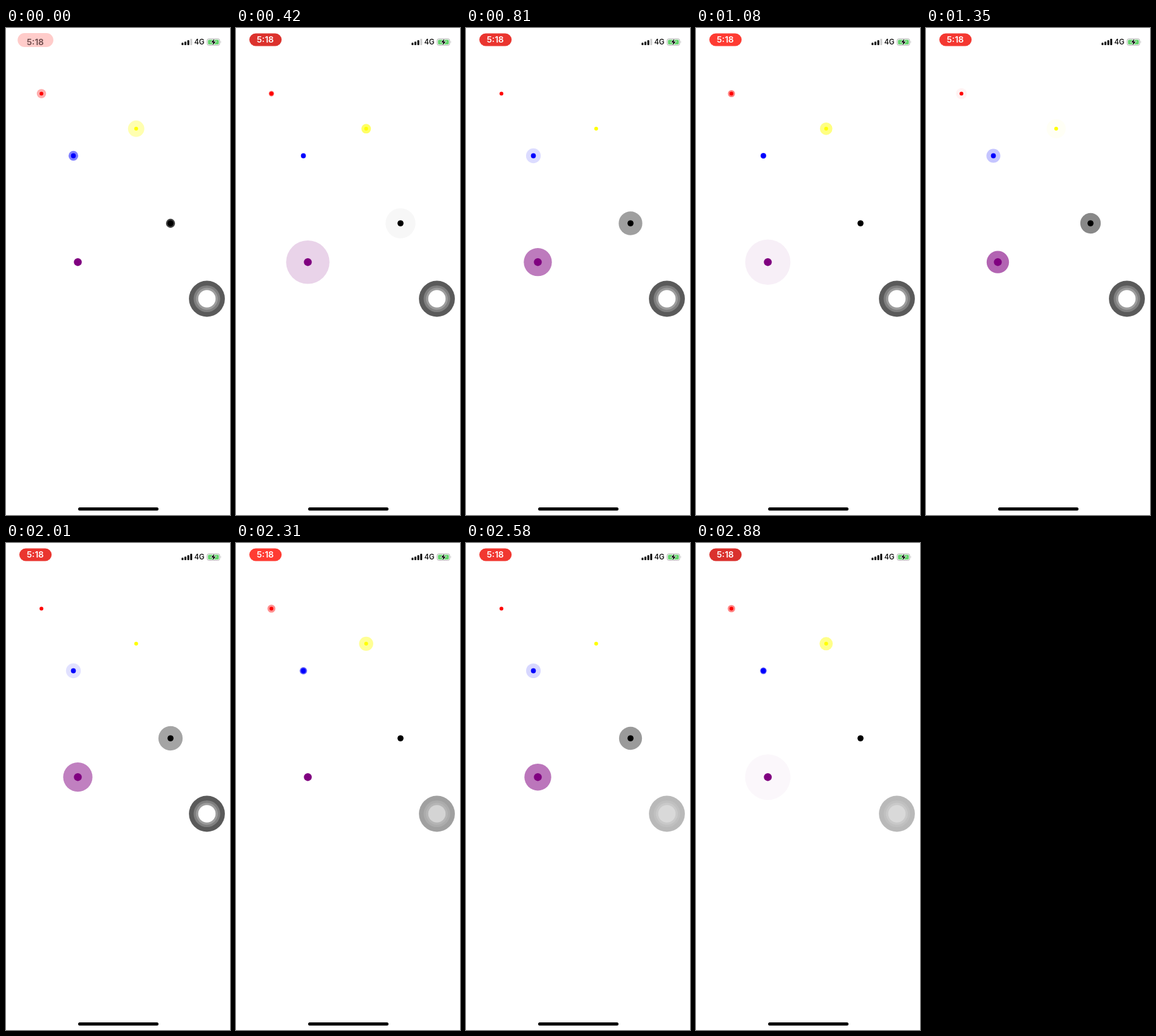
Write an HTML page that moves like this. It is 354 px wide and 768 px high and loops after 2.91 s.

```html
<!DOCTYPE html>
<html lang="en">
<head>
<meta charset="utf-8">
<title>Pulsing dots</title>
<style>
  html, body { margin: 0; width: 100%; height: 100%; overflow: hidden; background: #fff; }
  svg { display: block; width: 354px; height: 768px; }
  text { font-family: Inter, "Liberation Sans", sans-serif; text-anchor: middle; }
</style>
</head>
<body>
<svg viewBox="0 0 354 768">
  <rect id="pill"/>
  <text id="clock" x="46.3" font-size="13.5" font-weight="600">5:18</text>

  <g id="signal">
    <rect x="277.5" y="23.2" width="3" height="3.8" rx=".8"/>
    <rect x="282" y="21.5" width="3" height="5.5" rx=".8"/>
    <rect x="286.6" y="19.3" width="3" height="7.7" rx=".8"/>
    <rect id="bar4" x="291.2" y="17" width="3" height="10" rx=".8"/>
  </g>
  <text x="305.5" y="26.4" font-size="11.5" font-weight="500">4G</text>

  <rect x="317.8" y="17" width="20" height="10.4" rx="3" fill="none" stroke="#a9a9a9" stroke-width=".9"/>
  <rect x="319.2" y="18.4" width="17.2" height="7.6" rx="1.8" fill="#65d46e"/>
  <path d="M339.2 20.6q1.4 1.6 0 3.2z" fill="#a9a9a9"/>
  <path d="M329.3 16.8l-5 6h3.3l-1.3 4.8 5.2-6.2h-3.4z" stroke="#fff" stroke-width="1.4" paint-order="stroke"/>

  <g id="dots"></g>
  <g id="button"></g>
  <rect x="114" y="756" width="127" height="5" rx="2.5"/>
</svg>
<script>
const LOOP = 2910, STEP = 30, PULSE = 594;
const $ = id => document.getElementById(id);
const clamp = v => Math.max(0, Math.min(1, v));
const mix = (a, b, k) => a + (b - a) * k;
const rgb = (a, b, k) => `rgb(${a.map((v, i) => Math.round(mix(v, b[i], k)))})`;

function set(el, attrs) {
  for (const key in attrs) el.setAttribute(key, attrs[key]);
  return el;
}

function circle(parent, cx, cy, r, fill) {
  const el = document.createElementNS("http://www.w3.org/2000/svg", "circle");
  return parent.appendChild(set(el, { cx, cy, r, fill }));
}

// x, y, dot radius, halo radius, starting phase, colour
const halos = [
  [56, 103.5, 3, 8.7, .68, "#f00"],
  [205.7, 158.8, 3, 15.2, .69, "#ff0"],
  [106.5, 201.5, 3.9, 12, .5, "#00f"],
  [260, 308, 4.8, 23.8, .26, "#000"],
  [113.5, 369.2, 6.2, 36, .12, "#800080"]
].map(([x, y, r, max, phase, color]) => {
  const el = circle($("dots"), x, y, 0, color);
  circle($("dots"), x, y, r, color);
  return { el, max, phase };
});

// radius, then grey level when pressed, fading and idle
const rings = [
  [28.4, 90, 160, 185],
  [21, 127, 172, 192],
  [17.2, 156, 181, 201],
  [13.7, 255, 212, 217]
].map(([r, ...greys]) => ({ el: circle($("button"), 317.5, 427, r), greys }));

function drawHalos(t) {
  for (const { el, max, phase } of halos) {
    const u = (phase + t / PULSE) % 1;
    set(el, { r: max * Math.sin(u * Math.PI / 2) ** 1.3, opacity: 1 - u });
  }
}

function drawButton(t) {
  const a = clamp((t - 2190) / 120), b = clamp((t - 2310) / 150);
  for (const { el, greys: [pressed, fading, idle] } of rings) {
    const g = Math.round(mix(mix(pressed, fading, a), idle, b));
    set(el, { fill: `rgb(${g},${g},${g})` });
  }
}

function drawStatus(t) {
  const k = 1 - (1 - clamp(t / 300)) ** 2;
  const glow = .5 + .5 * Math.cos((t - 1130) / 1200 * 2 * Math.PI);
  const w = mix(56.5, 51, k), h = mix(22, 20, k);
  set($("pill"), {
    x: 46.6 - w / 2, y: mix(19, 18.5, k) - h / 2, width: w, height: h, rx: h / 2,
    fill: rgb([217, 49, 45], [255, 59, 50], glow),
    opacity: mix(.26, 1, k)
  });
  set($("clock"), { y: mix(26.8, 23.4, k), fill: rgb([108, 74, 74], [255, 255, 255], k) });
  set($("bar4"), { fill: t < 1110 ? "#ccc" : "#000" });
}

function frame(now) {
  const t = Math.floor(now % LOOP / STEP) * STEP;
  drawHalos(t);
  drawButton(t);
  drawStatus(t);
  requestAnimationFrame(() => frame(performance.now() - start));
}

const start = performance.now();
frame(0);
</script>
</body>
</html>
```
